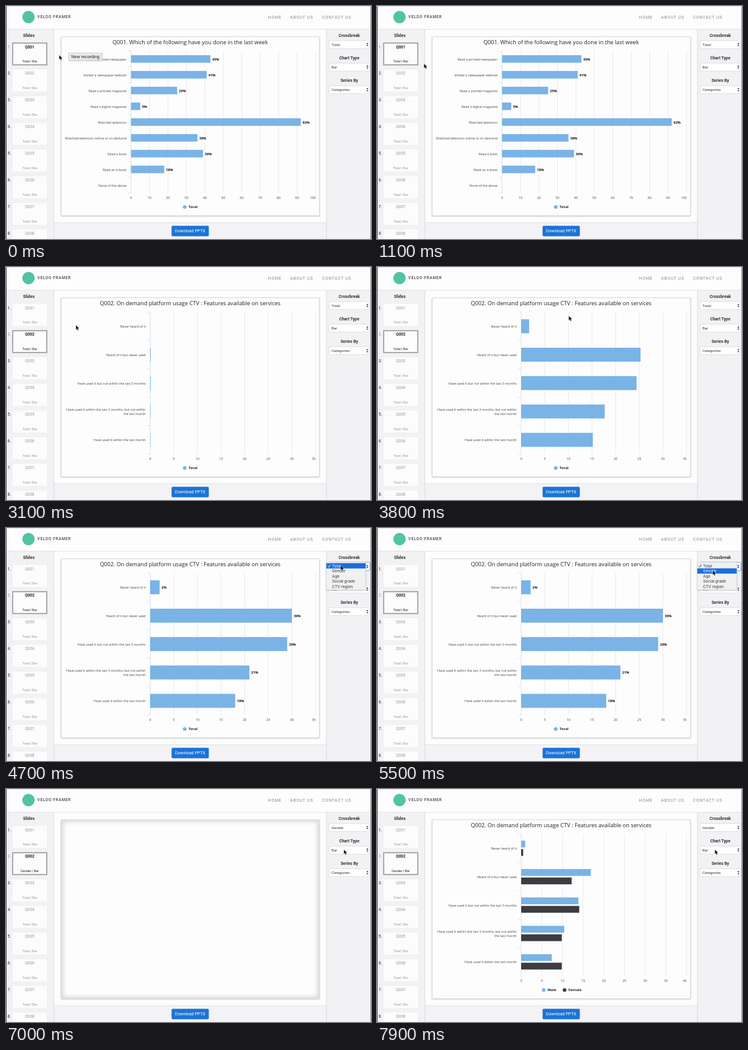
An HTML page for the animation above (8 s loop, 600x384 px).

```html
<!DOCTYPE html>
<html lang="en">
<head>
<meta charset="utf-8">
<title>Slide builder</title>
<style>
  html, body { margin: 0; width: 100%; height: 100%; overflow: hidden; background: #fdfdfe; }
  svg { display: block; width: 600px; height: 384px; }
  text { font-family: Roboto, sans-serif; white-space: pre; }
  .chart text { font-family: "Open Sans", "Noto Sans", sans-serif; }
  .menu text { font-family: Inter, sans-serif; }
  .tip { font-family: "Liberation Sans", sans-serif; }
</style>
</head>
<body>
<svg id="stage" viewBox="0 0 600 384" xmlns="http://www.w3.org/2000/svg">
  <defs>
    <filter id="soft" x="-10%" y="-10%" width="120%" height="120%"><feGaussianBlur stdDeviation="1.2"/></filter>
    <filter id="glow" x="-10%" y="-10%" width="120%" height="120%"><feGaussianBlur stdDeviation="3"/></filter>
    <clipPath id="panelClip"><rect x="91" y="51" width="424" height="294.5"/></clipPath>
  </defs>
  <g id="base"></g>
  <g id="slides"></g>
  <g id="chart" class="chart"></g>
  <g id="controls"></g>
  <g id="overlay"></g>
</svg>
<script>
const LOOP = 8000, STEP = 100;
const BLUE = '#7ab3e6', DARK = '#3c3c42';
const RIGHT = 508.8, TOP = 74.3, BOTTOM = 308.3;
const T = { pick: 2700, second: 3000, grow2: 3060, open: 4500, close: 6200,
            choose: 6600, blank: 6900, third: 7400, grow3: 7410 };

const layer = id => document.getElementById(id);
const clamp = v => Math.max(0, Math.min(1, v));
const swing = p => (1 - Math.cos(Math.PI * clamp(p))) / 2;

const rect = (x, y, w, h, fill, extra = '') =>
  `<rect x="${x}" y="${y}" width="${w}" height="${h}" fill="${fill}" ${extra}/>`;
const line = (x1, y1, x2, y2, color, w = 0.6) =>
  `<path d="M${x1} ${y1}L${x2} ${y2}" stroke="${color}" stroke-width="${w}" fill="none"/>`;
// y is the vertical middle of the capitals
const text = (s, x, y, size, fill, anchor = 'start', extra = '') =>
  `<text x="${x}" y="${y + size * 0.36}" font-size="${size}" fill="${fill}" text-anchor="${anchor}" ${extra}>${s}</text>`;
const BOLD = 'font-weight="700"';

const first = {
  title: 'Q001. Which of the following have you done in the last week',
  left: 205.5, max: 100, step: 10, thick: 12.4, pitch: 0,
  rows: ['Read a printed newspaper', 'Visited a newspaper website', 'Read a printed magazine',
    'Read a digital magazine', 'Watched television', 'Watched television online or on demand',
    'Read a book', 'Read an e-book', 'None of the above'],
  series: [{ name: 'Total', color: BLUE, dot: 293.8, values: [43, 41, 25, 5, 92, 36, 39, 18, 0] }]
};
const second = {
  title: 'Q002. On demand platform usage CTV : Features available on services',
  left: 237, max: 35, step: 5, thick: 23, pitch: 0,
  rows: ['Never heard of it', 'Heard of it but never used', 'Have used it but not within the last 3 months',
    'Have used it within the last 3 months, but not within|the last month', 'Have used it within the last month'],
  series: [{ name: 'Total', color: BLUE, dot: 293.8, values: [2, 30, 29, 21, 18] }]
};
const third = Object.assign({}, second, {
  max: 40, thick: 11.2, pitch: 14,
  series: [
    { name: 'Male', color: BLUE, dot: 274, values: [2, 34.8, 28.6, 21.5, 15.3] },
    { name: 'Female', color: DARK, dot: 308.3, values: [1, 25.2, 29, 20.3, 20.3] }
  ]
});

function drawChart(c, grown, labels) {
  const unit = (RIGHT - c.left) / c.max;
  const rowH = (BOTTOM - TOP) / c.rows.length;
  let out = text(c.title, 302.7, 60, 9.15, '#222', 'middle');
  for (let v = 0; v <= c.max; v += c.step) {
    const x = c.left + v * unit, last = v === c.max;
    if (v) out += line(x, TOP, x, BOTTOM, '#dedee0');
    out += text(v, last ? 509 : x, 316, 5.5, '#444', last ? 'end' : 'middle');
  }
  out += line(c.left, TOP, c.left, BOTTOM, '#c3d2de');
  for (let i = 0; i <= c.rows.length; i++) {
    const y = TOP + i * rowH;
    out += line(c.left - 5, y, c.left, y, '#c3d2de');
  }
  c.rows.forEach((row, i) => {
    const mid = TOP + (i + 0.5) * rowH;
    const parts = row.split('|');
    parts.forEach((s, k) => {
      const y = mid + 0.4 + (parts.length > 1 ? k * 6.6 - 3.3 : 0);
      out += text(s, c.left - 7.4, y, 5.38, '#444', 'end');
    });
    c.series.forEach((s, k) => {
      const y = mid + (k - (c.series.length - 1) / 2) * c.pitch;
      const w = s.values[i] * unit * grown;
      if (w > 0) out += rect(c.left, y - c.thick / 2, w, c.thick, s.color);
      if (labels > 0 && s.values[i])
        out += text(s.values[i] + '%', c.left + w + 3, y + 0.3, 5.6, '#111', 'start', `${BOLD} opacity="${labels}"`);
    });
  });
  c.series.forEach(s => {
    out += `<circle cx="${s.dot}" cy="331.2" r="3" fill="${s.color}"/>`;
    out += text(s.name, s.dot + 6.2, 331.3, 6, '#222', 'start', BOLD);
  });
  return out;
}

function drawBase() {
  const nav = 'letter-spacing="0.78"';
  return rect(0, 0, 600, 384, '#fdfdfe')
    + `<circle cx="37" cy="18.3" r="10.2" fill="#52c3a3"/>`
    + text('VELDO FRAMER', 51.5, 17.8, 6.4, '#444', 'start', 'font-weight="500" letter-spacing="0.75"')
    + text('HOME', 430.8, 18.3, 6.8, '#888', 'start', nav)
    + text('ABOUT US', 467, 18.3, 6.8, '#888', 'start', nav)
    + text('CONTACT US', 519.5, 18.3, 6.8, '#888', 'start', nav)
    + rect(0, 38, 78.5, 346, '#f2f2f4')
    + rect(527, 38, 73, 346, '#f2f2f4')
    + rect(79, 357, 448, 27, '#f3f3f5')
    + line(0, 38.3, 600, 38.3, '#dcdcde', 0.8)
    + line(78.7, 38, 78.7, 384, '#d4d4d7', 0.8)
    + line(526.8, 38, 526.8, 384, '#d4d4d7', 0.8)
    + line(79, 357, 527, 357, '#dcdcde', 0.8)
    + rect(90.5, 51, 425, 295.5, '#bbb', 'filter="url(#soft)"')
    + rect(91, 51, 424, 294.5, '#fdfdfe', 'stroke="#d5d5d8" stroke-width="0.6"')
    + rect(272.2, 362.2, 61.2, 17.4, '#1b74d6', 'rx="1.8"')
    + text('Download PPTX', 302.8, 370.8, 6.95, '#fff', 'middle')
    + text('Slides', 37.5, 48.7, 6.9, '#333', 'middle', BOLD)
    + rect(0, 0, 1, 384, '#4a4a4c') + rect(599.2, 0, 0.8, 384, '#77777a')
    + rect(0, 0, 600, 0.6, '#cfcfd2');
}

function drawSlides(active, cut) {
  let out = '';
  for (let i = 0; i < 8; i++) {
    const y = 60 + i * 43.95, on = i === active;
    const ink = on ? '#222' : '#999';
    out += rect(11, y + 1, 56, 36, '#fcfcfd', on ? 'stroke="#a9a9ab" stroke-width="2"' : '');
    out += text(i + 1 + '.', 2.6, y + 7, 7, on ? '#999' : '#333');
    out += text('Q00' + (i + 1), 39, y + 7.2, 6.5, ink, 'middle', on ? BOLD : '');
    out += text(`${i === 1 ? cut : 'Total'} | Bar`, 39, y + 31.3, 5.5, ink, 'middle');
  }
  return out;
}

function drawSelect(label, value, y, focus) {
  const halo = focus ? rect(530.5, y - 0.5, 67.5, 14, 'none', 'rx="2" stroke="#8fbbe8" stroke-width="1.6"') : '';
  return text(label, 564.3, y - 8.4, 6.8, '#333', 'middle', BOLD) + halo
    + rect(531, y, 66.6, 13, '#fefefe', 'rx="1.5" stroke="#cfcfd2" stroke-width="0.6"')
    + text(value, 535, y + 6.3, 6.25, '#333')
    + `<path d="M592.4 ${y + 5.7}l1.6 -2.3l1.6 2.3zM592.4 ${y + 7.3}l1.6 2.3l1.6 -2.3z" fill="#333"/>`;
}

function drawMenu(hover, opacity) {
  const items = ['Total', 'Gender', 'Age', 'Social grade', 'CTV region'];
  let out = `<g class="menu" opacity="${opacity}">`
    + rect(526.5, 57.5, 65, 45.5, '#888', 'opacity="0.5" filter="url(#soft)"')
    + rect(526.5, 56.5, 64.8, 45.5, '#f1f1f2', 'rx="1" stroke="#cacacc" stroke-width="0.5"')
    + rect(526.5, 58 + hover * 8.5, 64.8, 8.7, '#1a6ee0');
  items.forEach((s, i) => {
    out += text(s, 536, 62.4 + i * 8.5, 6.4, i === hover ? '#fff' : '#333');
  });
  return out + `<path d="M529 62.6l1.6 2l2.8 -4.6" fill="none" stroke="${hover ? '#333' : '#fff'}" stroke-width="0.9"/></g>`;
}

// time, x, y of the pointer tip
const path = [[0, 87.5, 81], [700, 87.5, 81], [1300, 74, 100], [2300, 51.5, 115], [2900, 51.5, 115],
  [3100, 115, 96], [3400, 150, 94], [4300, 550.3, 62], [4800, 550.3, 62], [5300, 552, 70],
  [6800, 552, 70], [7000, 555.5, 100], [LOOP, 555.5, 100]];

function pointer(t) {
  const i = Math.max(1, path.findIndex(k => k[0] >= t));
  const [t0, x0, y0] = path[i - 1], [t1, x1, y1] = path[i];
  const p = swing((t - t0) / (t1 - t0));
  return [x0 + (x1 - x0) * p, y0 + (y1 - y0) * p];
}

function drawPointer(x, y) {
  const hand = x > 11 && x < 67 && y > 104;
  const at = `transform="translate(${x} ${y})"`;
  return hand
    ? `<path ${at} d="M-.9 .6Q0 -.6 .9 .6V3.2Q1.8 2.6 2.4 3.5Q3.3 3 3.8 3.9Q5.2 3.6 5.2 5V6.6Q5 8 4.4 9.2H-.2Q-1.2 7.2 -2.8 5.6Q-3.2 4.4 -2 4.5L-.9 5.4Z" fill="#fff" stroke="#222" stroke-width=".8"/>`
    : `<path ${at} d="M0 0V7.2L1.7 5.6L2.9 8.4L4.1 7.9L2.9 5.2H5.2Z" fill="#111" stroke="#fff" stroke-width=".9" paint-order="stroke"/>`;
}

function drawTip(opacity) {
  return `<g opacity="${opacity}">` + rect(103.3, 78, 55, 12.6, '#999', 'opacity="0.5" filter="url(#soft)"')
    + rect(103.2, 77.2, 54.8, 12.4, '#e9e9ea', 'stroke="#bdbdbf" stroke-width="0.5"')
    + text('New recording', 130.5, 83.4, 7.2, '#222', 'middle', 'class="tip"') + '</g>';
}

function chartAt(t) {
  if (t < T.pick) return drawChart(first, 1, 1);
  if (t >= T.second && t < T.blank)
    return drawChart(second, swing((t - T.grow2) / 1000), clamp((t - T.grow2 - 1000) / 200));
  if (t >= T.third) return drawChart(third, swing((t - T.grow3) / 1000), 0);
  return `<g clip-path="url(#panelClip)">`
    + rect(91, 51, 424, 294.5, 'none', 'stroke="#d9d9dc" stroke-width="7" filter="url(#glow)"') + '</g>';
}

function render(t) {
  const [x, y] = pointer(t);
  const open = t >= T.open && t < T.close + 200;
  const tip = 1 - clamp((t - 500) / 300);
  layer('slides').innerHTML = drawSlides(t < T.pick ? 0 : 1, t < T.blank ? 'Total' : 'Gender');
  layer('chart').innerHTML = chartAt(t);
  layer('controls').innerHTML =
    drawSelect('Crossbreak', t < T.choose ? 'Total' : 'Gender', 57, t >= T.open && t < T.choose)
    + drawSelect('Chart Type', 'Bar', 94.2, false)
    + drawSelect('Series By', 'Categories', 131.4, false);
  const fade = t < T.close ? 1 : 0.14;
  layer('overlay').innerHTML = (tip > 0 ? drawTip(tip) : '')
    + (open ? drawMenu(y > 66.8 ? 1 : 0, fade) : '') + drawPointer(x, y);
}

layer('base').innerHTML = drawBase();
const start = performance.now();
let shown = -1;
function tick() {
  const t = Math.floor(((performance.now() - start) % LOOP) / STEP) * STEP;
  if (t !== shown) render(shown = t);
  requestAnimationFrame(tick);
}
tick();
</script>
</body>
</html>
```
